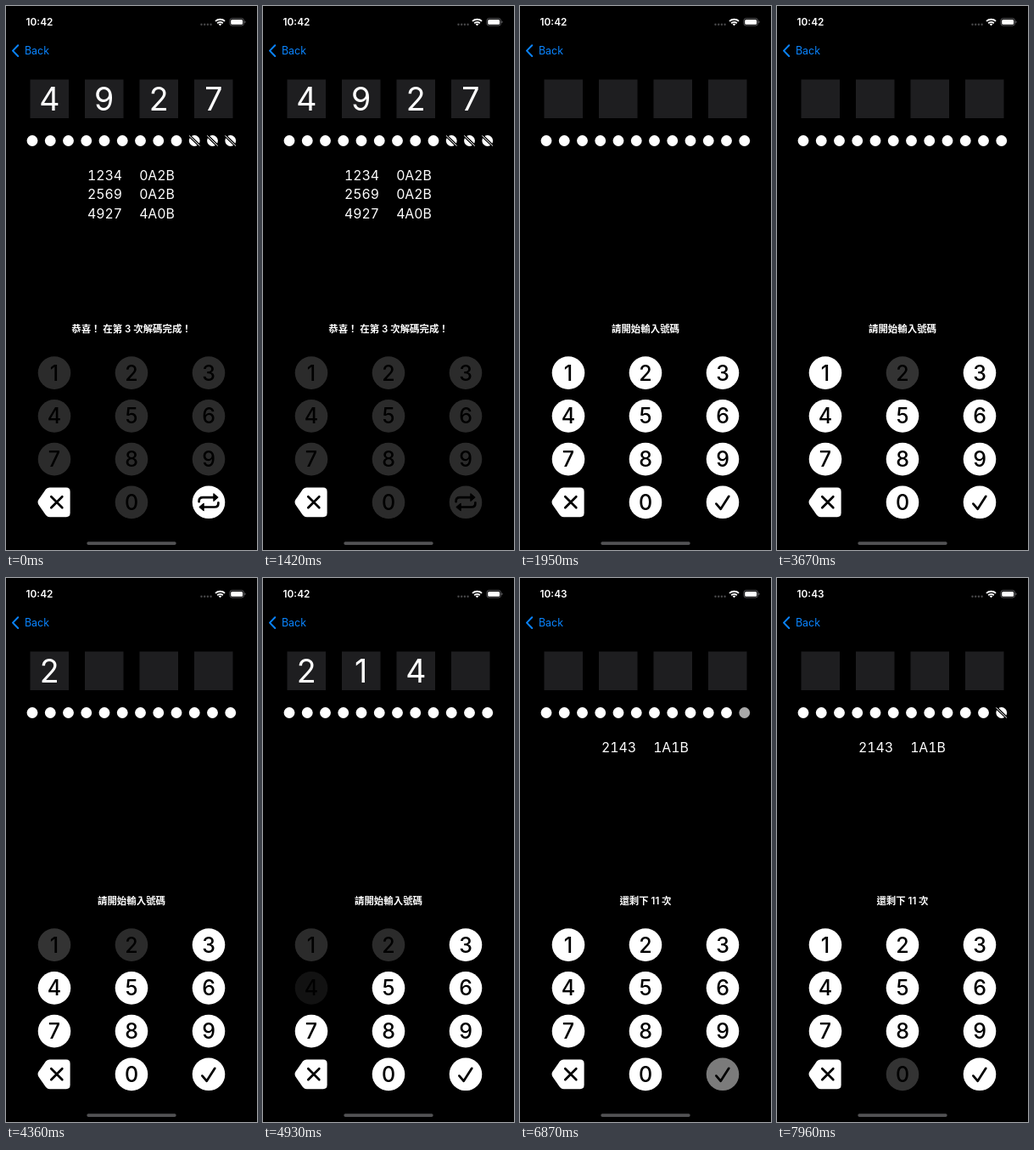
Animation of 296 by 640 pixels, one loop 8 s. Source, as an HTML page:

```html
<!DOCTYPE html>
<html lang="zh-Hant">
<head>
<meta charset="utf-8">
<title>Code breaker</title>
<style>
html, body { margin: 0; width: 100%; height: 100%; overflow: hidden; background: #000; }
svg { display: block; width: 100%; height: 100%; }
text { font-family: Inter, "Noto Sans CJK TC", "Noto Sans CJK", sans-serif; fill: #fff; white-space: pre; }
.mid { text-anchor: middle; }
.digit { font-size: 37.5px; }
.row { font-size: 15.8px; font-variant-numeric: tabular-nums; }
.note { font-size: 11.43px; font-weight: 600; }
.num { font-size: 25px; font-weight: 500; fill: #000; }
.ink { fill: none; stroke: #000; stroke-width: 2.7; stroke-linecap: round; stroke-linejoin: round; }
</style>
</head>
<body>
<svg id="stage" viewBox="0 0 296 640">
  <rect width="296" height="640"/>
  <text id="clock" x="23.6" y="23" font-size="11.8" font-weight="600"></text>
  <g fill="#48484a">
    <circle cx="230.5" cy="21.7" r="1.2"/><circle cx="234.2" cy="21.7" r="1.2"/>
    <circle cx="237.9" cy="21.7" r="1.2"/><circle cx="241.6" cy="21.7" r="1.2"/>
  </g>
  <g fill="none" stroke="#fff" stroke-width="1.9">
    <path d="M247 17.9a8 8 0 0 1 11 0"/>
    <path d="M249.2 20.2a4.9 4.9 0 0 1 6.6 0"/>
  </g>
  <path d="M252.5 23.3l-1.8-1.9a2.7 2.7 0 0 1 3.6 0z" fill="#fff"/>
  <rect x="263.9" y="14.6" width="16.6" height="8.4" rx="2.6" fill="none" stroke="#6c6c70" stroke-width=".8"/>
  <rect x="265.2" y="15.9" width="14" height="5.8" rx="1.5" fill="#fff"/>
  <path d="M281.5 17.4q1.2.4 1.2 1.4t-1.2 1.4z" fill="#6c6c70"/>
  <path d="M14.2 46.2L8 52.6L14.2 59" fill="none" stroke="#0a84ff" stroke-width="2" stroke-linecap="round" stroke-linejoin="round"/>
  <text x="22" y="57" font-size="12.4" style="fill:#0a84ff">Back</text>
  <g id="slots"></g>
  <g id="dots"></g>
  <g id="rows"></g>
  <text id="note" class="note mid" x="148" y="384.2"></text>
  <g id="keys"></g>
  <g>
    <path d="M51.5 566.4H71Q75.6 566.4 75.6 571V596.6Q75.6 601.2 71 601.2H51.5Q49 601.2 47 599L38.6 587Q36.4 583.8 38.6 580.6L47 568.6Q49 566.4 51.5 566.4Z" fill="#fff"/>
    <path class="ink" d="M53.3 577.2l13 13m0-13l-13 13"/>
  </g>
  <g id="repeat">
    <circle cx="239" cy="583.8" r="19.3" fill="#fff"/>
    <g id="arrow">
      <path class="ink" d="M227.6 583.2v-.6q0-4.5 4.5-4.5h13"/>
      <path d="M244.8 573.6l5.4 4.5l-5.4 4.5z" stroke="#000" stroke-linejoin="round"/>
    </g>
    <use href="#arrow" transform="rotate(180 239 583.8)"/>
  </g>
  <g id="check">
    <circle cx="239" cy="583.8" r="19.3" fill="#fff"/>
    <path class="ink" d="M231.4 585.6l5.3 6.2l9.6-15"/>
  </g>
  <rect x="95.3" y="630.2" width="105.4" height="3.8" rx="1.9" fill="#525254"/>
</svg>
<script>
const LOOP = 8000, RESET = 1590, SENT = 6800;
const OFF = .17, PRESS = .2, DIM = .07, HALF = .12;
const $ = id => document.getElementById(id);

function add(parent, tag, attrs, text = '') {
  const el = document.createElementNS('http://www.w3.org/2000/svg', tag);
  for (const k in attrs) el.setAttribute(k, attrs[k]);
  el.textContent = text;
  parent.appendChild(el);
  return el;
}
const ramp = (t, a, b, from = 0, to = 1) =>
  from + (to - from) * Math.min(1, Math.max(0, (t - a) / (b - a)));
const fade = (el, v) => el.setAttribute('opacity', v.toFixed(3));
const put = (el, s) => { if (el.textContent !== s) el.textContent = s; };

const slots = [0, 1, 2, 3].map(i => {
  const x = 28.5 + 64.5 * i;
  add($('slots'), 'rect', { x, y: 86.5, width: 45.5, height: 45.5, fill: '#1e1e20' });
  return add($('slots'), 'text', { class: 'digit mid', x: x + 22.75, y: 122.6 });
});

const dots = Array.from({ length: 12 }, (_, i) => {
  const g = add($('dots'), 'g', { transform: `translate(${31 + 21.25 * i} 158.5)` });
  const cut = add(g, 'g', {});
  const d = 'M-6 -5.8L6 5.8';
  add(cut, 'circle', { r: 6.4, fill: '#fff' });
  add(cut, 'path', { d, stroke: '#000', 'stroke-width': 3.2, 'stroke-linecap': 'square' });
  add(cut, 'path', { d, stroke: '#fff', 'stroke-width': 1, 'stroke-linecap': 'round' });
  return { cut, full: add(g, 'circle', { r: 6.4, fill: '#fff' }) };
});

const rows = [0, 1, 2].map(i => [116.5, 178].map(x =>
  add($('rows'), 'text', { class: 'row mid', x, y: 204.6 + 22.8 * i })));

const keys = Array.from({ length: 10 }, (_, n) => {
  const i = n ? n - 1 : 10;
  const x = 57 + 91 * (i % 3), y = 431.6 + 50.75 * Math.floor(i / 3);
  const g = add($('keys'), 'g', {});
  add(g, 'circle', { cx: x, cy: y, r: 19.3, fill: '#fff' });
  add(g, 'text', { class: 'num mid', x, y: y + 9.1 }, String(n));
  return g;
});

// Each tap: digit, press, entry, half lit, settled
const taps = [
  [2, 3670, 3790, 3960, 4190],
  [1, 4360, 4490, 4560, 4630],
  [4, 4790, 4930, 5080, 5230],
  [3, 5550, 5720, 5870, 6040]
];

function keyLevel(n, t) {
  if (t < RESET + 110) return ramp(t, RESET, RESET + 110, OFF, 1);
  if (n === 0) return t < 7960 ? 1 : PRESS;
  const tap = taps.find(p => p[0] === n);
  if (!tap || t < tap[1]) return 1;
  if (t >= SENT) return ramp(t, SENT, SENT + 65, OFF, 1);
  return t < tap[2] ? PRESS : t < tap[3] ? DIM : t < tap[4] ? HALF : OFF;
}

function checkLevel(t) {
  if (t < RESET) return 0;
  if (t < 6700) return ramp(t, RESET, 1900, OFF, 1);
  return ramp(t, SENT, 7000, PRESS, 1);
}

function drawDots(t) {
  dots.forEach(({ cut, full }, i) => {
    let a = 0, b = 1;
    if (t < 1950 && i > 8) {
      a = 1;
      b = ramp(t, RESET, 1900);
    } else if (t >= SENT && i === 11) {
      a = ramp(t, 6940, 7210);
      b = ramp(t, SENT, 7010, 1, 0);
    }
    fade(cut, a);
    fade(full, b);
  });
}

function draw(t) {
  const solved = t < RESET, sent = t >= SENT;
  const typed = solved ? '4927' : sent ? ''
    : taps.filter(p => t >= p[2]).map(p => p[0]).join('');
  const log = solved ? [['1234', '0A2B'], ['2569', '0A2B'], ['4927', '4A0B']]
    : sent ? [['2143', '1A1B']] : [];

  put($('clock'), sent ? '10:43' : '10:42');
  put($('note'), solved ? '恭喜！ 在第 3 次解碼完成！'
    : sent ? '還剩下 11 次' : '請開始輸入號碼');
  slots.forEach((el, i) => put(el, typed[i] || ''));
  rows.forEach((row, i) => row.forEach((el, j) => put(el, log[i] ? log[i][j] : '')));
  keys.forEach((el, n) => fade(el, keyLevel(n, t)));
  fade($('repeat'), solved ? (t < 1420 ? 1 : OFF) : 0);
  fade($('check'), checkLevel(t));
  drawDots(t);
}

function tick() {
  draw(performance.now() % LOOP);
  requestAnimationFrame(tick);
}
tick();
</script>
</body>
</html>
```
